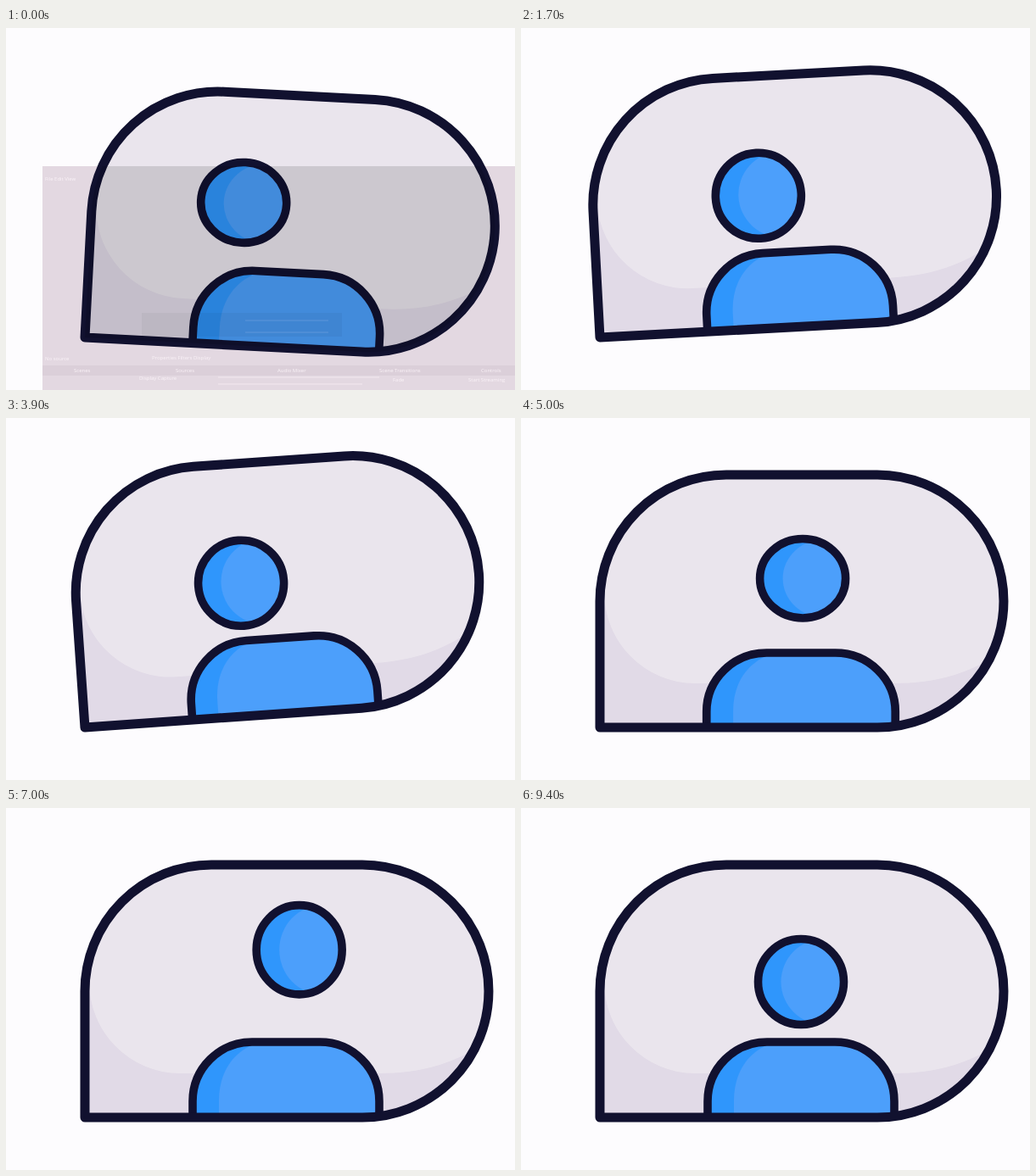
An HTML page that plays this animation: 600 by 427 pixels, repeating every 9500 ms.

```html
<!DOCTYPE html>
<html lang="en">
<head>
<meta charset="utf-8">
<title>Rocking portrait bubble</title>
<style>
  html, body { margin: 0; width: 100%; height: 100%; overflow: hidden; background: #fdfcfe; }
  svg { display: block; width: 100%; height: 100%; }
  .line { fill: none; stroke: #11112f; stroke-width: 9.6; stroke-linejoin: round; }
  .thick { stroke-width: 11; }
  text { font: 6px "Open Sans", sans-serif; fill: #fbf3f8; }
</style>
</head>
<body>
<svg viewBox="0 0 600 427" xmlns="http://www.w3.org/2000/svg">
  <defs>
    <path id="shell" d="M93 365V216A149 149 0 0 1 242 67H420A149 149 0 0 1 420 365Z"/>
    <path id="torso" d="M220 364V346A70 70 0 0 1 290 276H370A70 70 0 0 1 440 346V362"/>
    <clipPath id="inShell"><use href="#shell"/></clipPath>
    <clipPath id="inTilted"><use id="tiltClip" href="#shell"/></clipPath>
    <clipPath id="inTorso"><use href="#torso"/></clipPath>
    <clipPath id="inHead"><ellipse class="head"/></clipPath>
  </defs>

  <g id="desk">
    <rect x="43" y="163" width="557" height="264" fill="#e3d8e1"/>
    <rect x="43" y="398" width="557" height="12" fill="#dbcfd9"/>
    <text x="46" y="180">File  Edit  View</text>
    <text x="46" y="392">No source</text>
    <text x="172" y="391">Properties   Filters   Display</text>
    <text x="157" y="415">Display Capture</text>
    <text x="456" y="417">Fade</text>
    <text x="545" y="417">Start Streaming</text>
    <path d="M250 412H440M250 420H420" stroke="#f3e9ef"/>
  </g>

  <g id="bubble">
    <use href="#shell" fill="#eae5ed"/>
    <path clip-path="url(#inShell)" fill="#e1dae7"
      d="M93 205H98A107 108 0 0 0 205 313H440C485 313 525 304 570 274V370H93Z"/>
    <g id="body">
      <use href="#torso" fill="#2f96fc"/>
      <path clip-path="url(#inTorso)" fill="#4c9ffb" d="M251 370V345C251 312 268 285 300 276H450V370Z"/>
      <use href="#torso" class="line"/>
    </g>
    <use href="#shell" class="line thick"/>
    <ellipse class="head" fill="#2f96fc"/>
    <ellipse id="glow" clip-path="url(#inHead)" fill="#4c9ffb"/>
    <ellipse class="head line"/>
  </g>

  <g id="veil" clip-path="url(#inTilted)">
    <rect x="43" y="163" width="557" height="264" fill="#0a0008" opacity=".13"/>
    <rect x="160" y="336" width="236" height="28" opacity=".04"/>
    <path d="M282 345H380M282 359H380" stroke="#fff" opacity=".16"/>
  </g>
</svg>
<script>
const LOOP = 9500, CYCLE = 2100, LEAD = 1100;
const $ = id => document.getElementById(id);
const heads = document.querySelectorAll('.head');

// Bubble: lift, slam, then ring out. [end ms, degrees]
const swings = [[330, -13.5], [460, 9], [600, -2.1], [800, -4], [1100, 3], [1400, -1.2], [1500, 0]];

// Head: slide down the tilt, then hop across and back.
const moves = [
  { from: 400, to: 700, x: -41.5, y: 3, lift: 0 },
  { from: 800, to: 1060, x: -61, y: 0, lift: 0 },
  { from: 1060, to: 1500, x: 46, y: 0, lift: 30 },
  { from: 1570, to: 1950, x: 0, y: 0, lift: 40 }
];

const part = (t, a, b) => Math.min(1, Math.max(0, (t - a) / (b - a)));
const ease = u => u * u * (3 - 2 * u);
const pulse = (t, a, b) => Math.sin(Math.PI * part(t, a, b));

function tiltAt(t) {
  let angle = 0, from = 0;
  for (const [to, goal] of swings) {
    angle += (goal - angle) * ease(part(t, from, to));
    from = to;
  }
  return angle;
}

function headAt(t) {
  let x = 0, y = 0, rise = 0, stretch = 7 * pulse(t, 500, 700);
  for (const m of moves) {
    const u = part(t, m.from, m.to), e = ease(u);
    x += (m.x - x) * e;
    y += (m.y - y) * e;
    rise += m.lift * Math.sin(Math.PI * u);
    if (m.lift) stretch -= 4 * Math.sin(3 * Math.PI * u);
  }
  return { cx: 330 + x, cy: 205 + y - rise, rx: 50.5, ry: 50.5 + stretch };
}

function setAll(el, attrs) {
  for (const k in attrs) el.setAttribute(k, attrs[k]);
}

function draw(ms) {
  const t = ms % LOOP, p = (t + LEAD) % CYCLE;
  const transform = `rotate(${tiltAt(p)} 93 365)`;
  setAll($('bubble'), { transform });
  setAll($('tiltClip'), { transform });

  const head = headAt(p);
  heads.forEach(h => setAll(h, head));
  setAll($('glow'), { ...head, cx: head.cx + 27 });

  // The torso gives a little when the head lands.
  const s = .016 * pulse(p, 1850, 2050);
  setAll($('body'), {
    transform: `translate(330 365) scale(${1 + s} ${1 - s}) translate(-330 -365)`
  });

  const opacity = 1 - part(t, 0, 200);
  setAll($('desk'), { opacity });
  setAll($('veil'), { opacity });
}

['Scenes', 'Sources', 'Audio Mixer', 'Scene Transitions', 'Controls'].forEach((name, i) => {
  const label = document.createElementNS('http://www.w3.org/2000/svg', 'text');
  label.textContent = name;
  setAll(label, { x: 80 + 120 * i, y: 406 });
  $('desk').append(label);
});

const start = performance.now();
function tick() {
  draw(performance.now() - start);
  requestAnimationFrame(tick);
}
draw(0);
requestAnimationFrame(tick);
</script>
</body>
</html>
```
